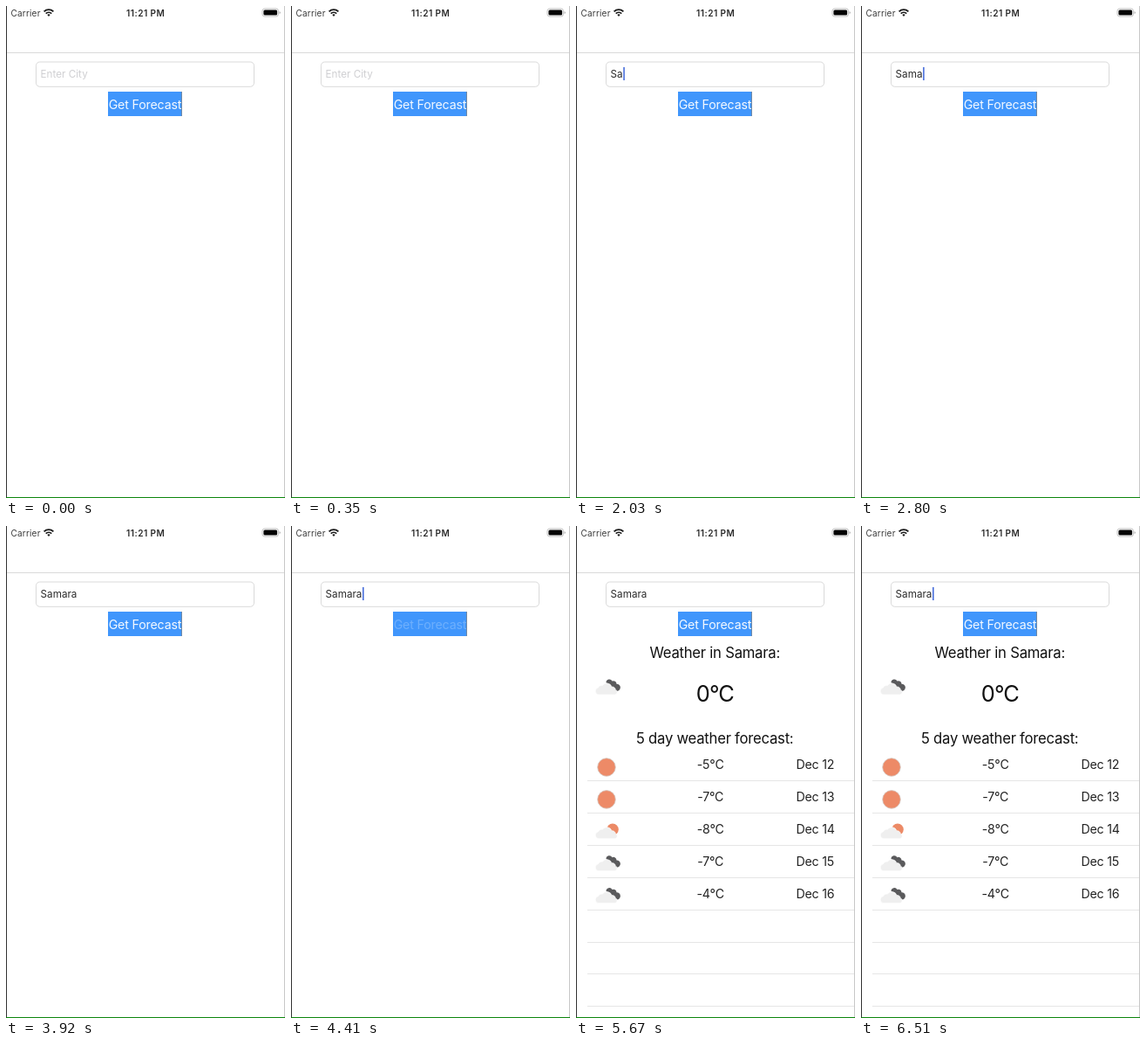
Animation of 320x563 px, one loop 6.65 s. Source, as an HTML page:

```html
<!DOCTYPE html>
<html lang="en">
<head>
<meta charset="utf-8">
<title>Weather forecast</title>
<style>
  html, body { margin: 0; width: 100%; height: 100%; overflow: hidden; background: #fff; }
  svg { display: block; width: 100%; height: 100%; }
  text { font-family: Inter, Roboto, sans-serif; fill: #111; white-space: pre; }
  .mid { text-anchor: middle; }
  .status { font-size: 10.1px; letter-spacing: .15px; fill: #3c3c3c; }
  .clock { font-size: 10.1px; font-weight: 600; letter-spacing: .45px; fill: #2a2a2a; }
  .field { font-size: 11.7px; fill: #2a2a2a; }
  .hint { fill: #cfcfd2; }
  .button { font-size: 14.2px; letter-spacing: -.15px; fill: #f4f9ff; }
  .title { font-size: 16.7px; letter-spacing: -.25px; }
  .now { font-size: 25.4px; letter-spacing: -1px; }
  .row { font-size: 14.2px; letter-spacing: -.2px; fill: #222; }
  .line { shape-rendering: crispEdges; }
</style>
</head>
<body>
<svg viewBox="0 0 320 563">
  <defs>
    <path id="cloud" d="M-10 9a4 4 0 0 1-.6-7.9A4.6 4.6 0 0 1-5.6-1.6 6 6 0 0 1 5 0a3.6 3.6 0 0 1 4.3 3.2A3 3 0 0 1 8.5 9z"
          fill="#efefef" stroke="#fff" stroke-width=".6"/>
    <g id="cloudy">
      <path d="M-1.5-5a3.7 3.7 0 0 1 7-1.5 3.5 3.5 0 0 1 5 3.2A3.9 3.9 0 0 1 11 5H7z" fill="#5a5a5c"/>
      <use href="#cloud"/>
    </g>
    <g id="partly">
      <circle cx="6" cy="-1.5" r="6.8" fill="#ec8a66"/>
      <use href="#cloud"/>
    </g>
    <circle id="sunny" cy="1" r="10.3" fill="#ed8a67" stroke="#d5c8c2" stroke-width=".8"/>
  </defs>

  <rect width="320" height="563" fill="#fff"/>

  <text class="status" x="5.5" y="11.5">Carrier</text>
  <g fill="none" stroke="#1a1a1a" stroke-width="1.8">
    <path d="M43.6 6.3a7.7 7.7 0 0 1 10.8 0M45.7 8.7a4.7 4.7 0 0 1 6.6 0"/>
    <path d="M47.3 10.1a2.4 2.4 0 0 1 3.4 0L49 12z" fill="#1a1a1a" stroke="none"/>
  </g>
  <text class="clock mid" x="160.2" y="11.5">11:21 PM</text>
  <rect x="294" y="3" width="18.5" height="9" rx="2.7" fill="#fff" stroke="#b4b4b4" stroke-width=".8"/>
  <rect x="295.4" y="4.4" width="15.7" height="6.2" rx="1.5" fill="#050505"/>
  <path d="M313.5 6v3q1.4-.5 1.4-1.5t-1.4-1.5" fill="#b4b4b4"/>
  <rect class="line" y="53" width="320" height="1" fill="#dadada"/>

  <rect x="34.5" y="64" width="250" height="28.3" rx="4.3" fill="#fff" stroke="#dadada"/>
  <text id="hint" class="field hint" x="39.6" y="82">Enter City</text>
  <text id="city" class="field" x="39.6" y="82"></text>
  <rect id="caret" y="70" width="1.6" height="15" fill="#4a6fdc"/>

  <rect class="line" x="117" y="98" width="85" height="28" fill="#4096fc"/>
  <rect class="line" x="201" y="98" width="1" height="28" fill="#7389a3"/>
  <text id="label" class="button mid" x="159.5" y="118">Get Forecast</text>

  <g id="forecast">
    <text class="title mid" x="159.2" y="150.5">Weather in Samara:</text>
    <use href="#cloudy" x="36" y="184"/>
    <text class="now mid" x="159.3" y="200.8">0°C</text>
    <text class="title mid" x="159.2" y="248.5">5 day weather forecast:</text>
  </g>

  <rect class="line" width="1" height="563" fill="#333"/>
  <rect class="line" x="319" width="1" height="563" fill="#c8c8c8"/>
  <rect class="line" y="562" width="320" height="1" fill="#0c860c"/>
</svg>
<script>
const LOOP = 6650, ROW = 36.9, FIELD_X = 39.6, CITY = "Samara";
const KEYS = [1470, 2030, 2590, 2800, 3080, 3220];
const CARET = [[0, 0], [840, 1], [3780, .7], [3850, .35], [3920, 0],
  [4270, .4], [4340, .8], [4410, 1], [4830, .7], [4900, .35], [4970, 0],
  [6440, .5], [6510, 1]];
const LABEL = [[0, 1], [4340, .4], [4410, .25], [4550, .5], [4620, .75], [4690, .92], [4830, 1]];
const DAYS = [["sunny", -5], ["sunny", -7], ["partly", -8], ["cloudy", -7], ["cloudy", -4]];

const [hint, city, caret, label, forecast] =
  ["hint", "city", "caret", "label", "forecast"].map(id => document.getElementById(id));

function add(tag, attrs, text = "") {
  const el = document.createElementNS("http://www.w3.org/2000/svg", tag);
  for (const key in attrs) el.setAttribute(key, attrs[key]);
  el.textContent = text;
  forecast.append(el);
}

DAYS.forEach(([icon, degrees], i) => {
  const y = 278 + ROW * i;
  add("use", { href: "#" + icon, x: icon === "sunny" ? 35 : 36, y: y - 3 });
  add("text", { class: "row mid", x: 154.2, y }, degrees + "°C");
  add("text", { class: "row", x: 252.4, y }, "Dec " + (12 + i));
});
for (let i = 0; i < 8; i++) {
  add("rect", { class: "line", x: 13, y: Math.round(291 + ROW * i), width: 306, height: 1, fill: "#e6e6e6" });
}

// Value of the last step reached at time t.
const stepAt = (steps, t) => steps.filter(([at]) => at <= t).pop()[1];

let start, shown;
function draw(now) {
  start ??= now;
  const t = (now - start) % LOOP;
  const typed = KEYS.filter(at => at <= t).length;
  if (typed !== shown) {
    shown = typed;
    city.textContent = CITY.slice(0, typed);
    caret.setAttribute("x", FIELD_X + .6 + (typed ? city.getComputedTextLength() : 0));
    hint.style.visibility = typed ? "hidden" : "visible";
  }
  caret.style.opacity = stepAt(CARET, t);
  label.style.opacity = stepAt(LABEL, t);
  forecast.style.visibility = t >= 5670 ? "visible" : "hidden";
  requestAnimationFrame(draw);
}
draw(performance.now());
</script>
</body>
</html>
```
